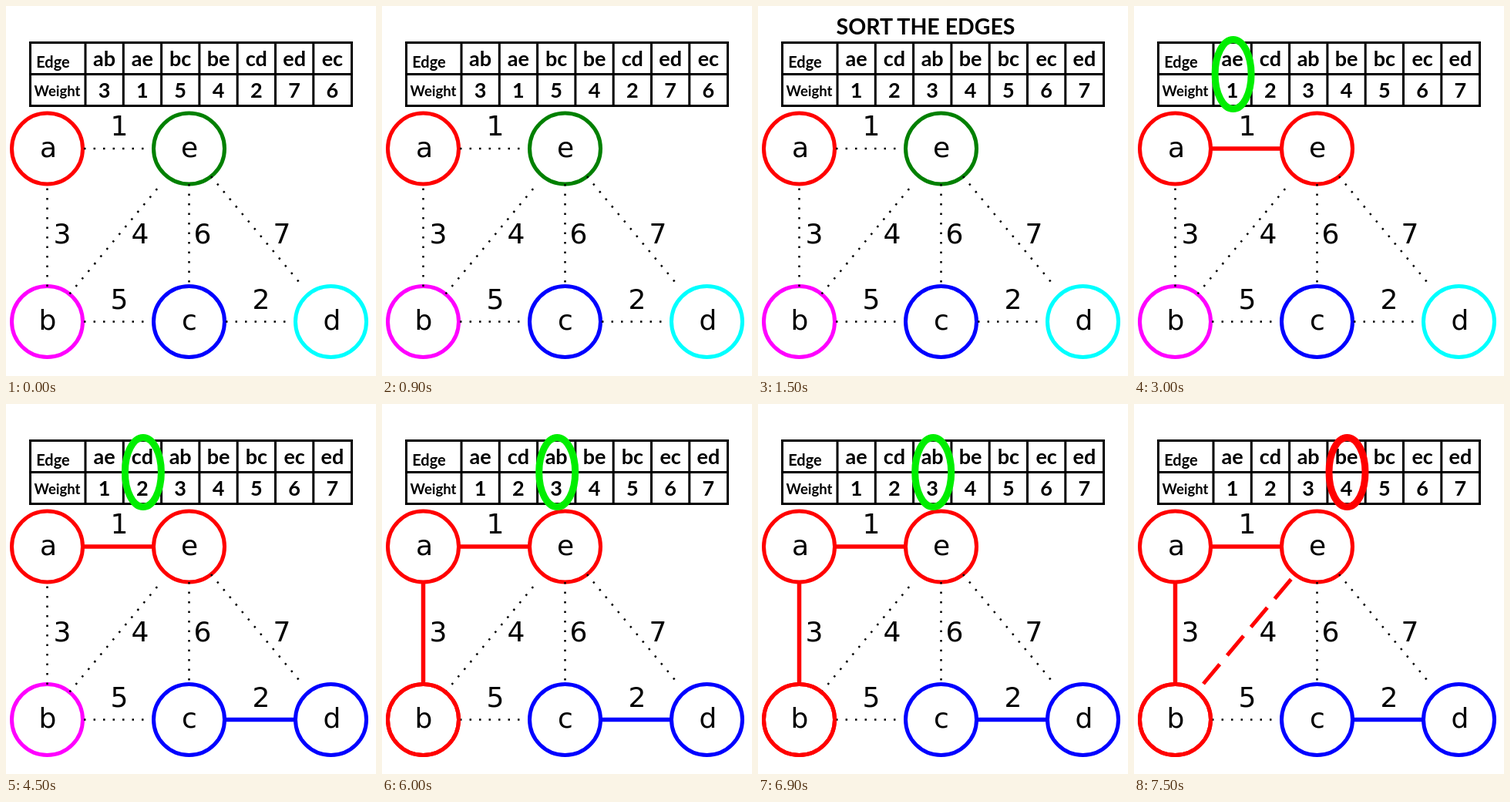
Write an HTML page that moves like this. It is 480 px wide and 480 px high and loops after 8 s.

```html
<!DOCTYPE html>
<html lang="en">
<head>
<meta charset="utf-8">
<title>Sorted edges</title>
<style>
  html, body { margin: 0; width: 100%; height: 100%; overflow: hidden; background: #fff; }
  svg { display: block; width: 100vw; height: 100vh; }
  text { text-anchor: middle; }
  .table { font: 700 27px Lato, sans-serif; }
  .graph { font: 36px "DejaVu Sans", sans-serif; }
</style>
</head>
<body>
<svg id="stage" viewBox="0 0 480 480"></svg>
<script>
const stage = document.getElementById("stage");
const LOOP = 8000, STEP = 1500;
const RED = "#f00", BLUE = "#00f", GREEN = "#0e0";

const nodes = {
  a: { x: 53.5, y: 185, color: RED, label: [55, 196] },
  e: { x: 237.5, y: 185, color: "#008000", label: [238, 196] },
  b: { x: 53.5, y: 409.5, color: "#f0f", label: [54, 420] },
  c: { x: 237.5, y: 409.5, color: BLUE, label: [238, 420] },
  d: { x: 421.5, y: 409.5, color: "#0ff", label: [423, 420] }
};

// dots: x1, y1, x2, y2; label: x, baseline
const edges = {
  ae: { weight: 1, dots: [101, 185, 182, 185], label: [147, 168] },
  cd: { weight: 2, dots: [285, 409.5, 366, 409.5], label: [331, 393] },
  ab: { weight: 3, dots: [53.5, 364, 53.5, 236], label: [73, 308] },
  be: { weight: 4, dots: [82.5, 373.5, 202, 230], label: [174, 308] },
  bc: { weight: 5, dots: [101, 409.5, 182, 409.5], label: [147, 393] },
  ec: { weight: 6, dots: [237.5, 231, 237.5, 359], label: [255, 308] },
  ed: { weight: 7, dots: [266, 221, 385.5, 364.5], label: [358, 308] }
};

const unsorted = ["ab", "ae", "bc", "be", "cd", "ed", "ec"];
const sorted = Object.keys(edges);

const text = (s, x, y, extra = "") => `<text x="${x}" y="${y}" ${extra}>${s}</text>`;
const line = ([x1, y1, x2, y2], color, width, dash = "none") =>
  `<path d="M${x1} ${y1}L${x2} ${y2}" stroke="${color}" stroke-width="${width}" stroke-dasharray="${dash}"/>`;
const ring = (x, y, rx, ry, color, width) =>
  `<ellipse cx="${x}" cy="${y}" rx="${rx}" ry="${ry}" fill="none" stroke="${color}" stroke-width="${width}"/>`;
const columnCenter = i => 127.6 + i * 49.3;

function drawTable(step) {
  let out = '<path d="M31.5 47.5H448.5V129.5H31.5ZM31.5 88.5H448.5';
  for (let i = 0; i < 7; i++) out += `M${103 + i * 49.3} 47.5V129.5`;
  out += '" fill="none" stroke="#000" stroke-width="3"/>';
  out += text("Edge", 61, 80, 'style="font-size:20px"') + text("Weight", 66.5, 117, 'style="font-size:18.5px"');
  (step ? sorted : unsorted).forEach((name, i) => {
    out += text(name, columnCenter(i), 78) + text(edges[name].weight, columnCenter(i), 119);
  });
  if (step === 1) out += text("SORT THE EDGES", 217.5, 37, 'style="font-size:28.5px"');
  if (step > 1) out += ring(columnCenter(step - 2) + 1, 88.5, 23.5, 45, step === 5 ? RED : GREEN, 9);
  return `<g class="table">${out}</g>`;
}

function drawEdge(name, step) {
  const { weight, dots, label } = edges[name];
  const [from, to] = [...name].map(key => nodes[key]);
  let path;
  if (name === "be" && step === 5) {
    path = line([90, 363, 204.5, 226.5], RED, 5, "33 15");
  } else if (weight <= 3 && step > weight) {
    path = line([from.x, from.y, to.x, to.y], name === "cd" ? BLUE : RED, 5.5);
  } else {
    path = line(dots, "#000", 2.5, "2.5 10");
  }
  return { path, label: text(weight, ...label), solid: weight <= 3 && step > weight };
}

function nodeColor(key, step) {
  if (key === "e" && step >= 2 || key === "b" && step >= 4) return RED;
  if (key === "d" && step >= 3) return BLUE;
  return nodes[key].color;
}

function drawGraph(step) {
  const drawn = sorted.map(name => drawEdge(name, step));
  const join = (list, field) => list.map(item => item[field]).join("");
  const circle = key => ring(nodes[key].x, nodes[key].y, 46, 46, nodeColor(key, step), 5);
  const keys = Object.keys(nodes);
  const discs = keys.map(key => `<circle cx="${nodes[key].x}" cy="${nodes[key].y}" r="46" fill="#fff"/>`);
  return '<g class="graph">'
    + join(drawn.filter(edge => edge.solid), "path")
    + discs.join("") + keys.map(circle).join("")
    + join(drawn.filter(edge => !edge.solid), "path")
    + (step >= 4 ? circle("b") : "")
    + join(drawn, "label")
    + keys.map(key => text(key, ...nodes[key].label)).join("")
    + "</g>";
}

let shown = -1;
function render(now) {
  const step = Math.floor(now % LOOP / STEP);
  if (step !== shown) {
    stage.innerHTML = drawGraph(step) + drawTable(step);
    shown = step;
  }
  requestAnimationFrame(render);
}
render(0);
</script>
</body>
</html>
```
